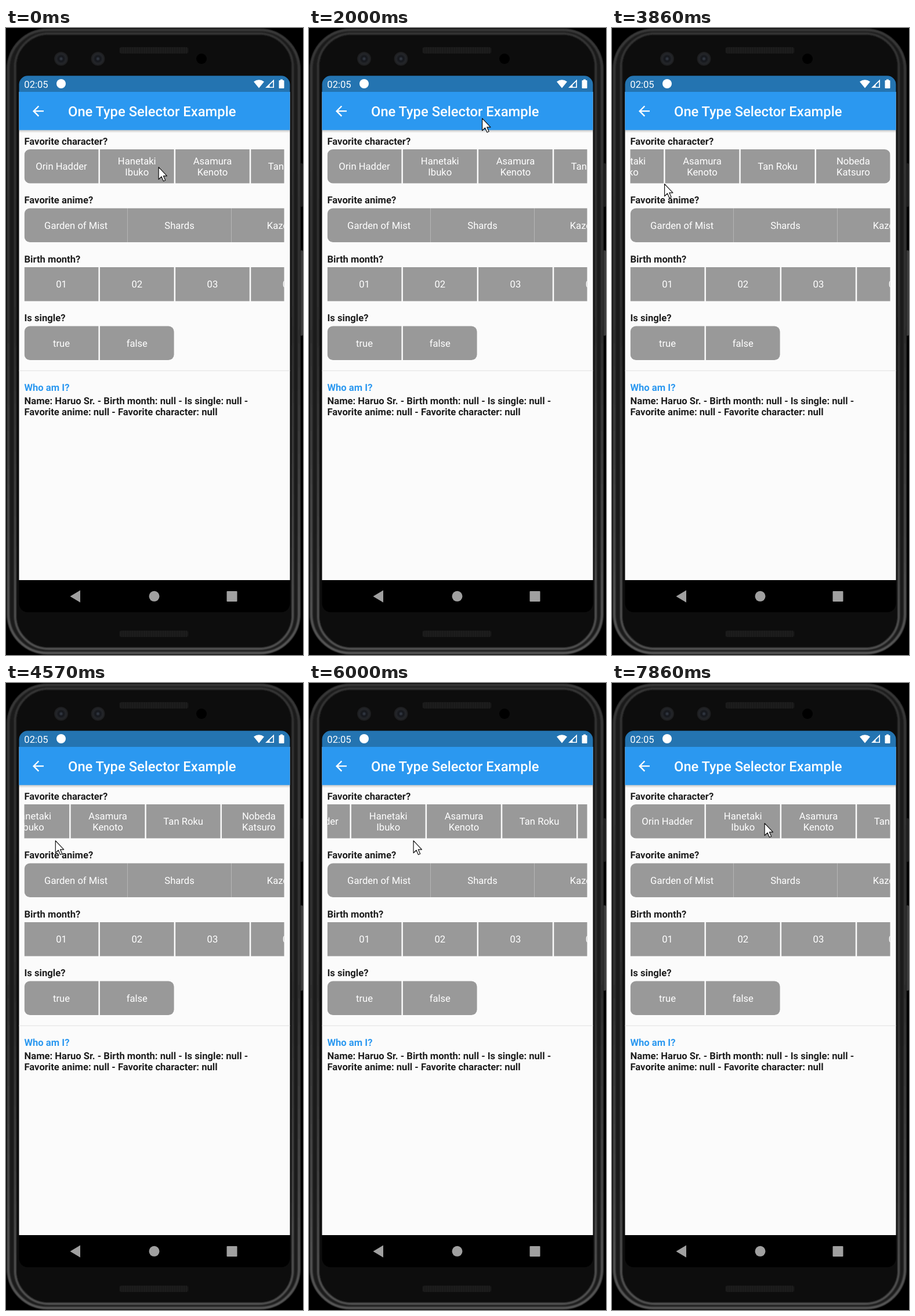
These frames come from a looping animation (512x1080 px, 8000 ms). An HTML page:

```html
<!DOCTYPE html>
<html lang="en">
<head>
<meta charset="utf-8">
<title>One Type Selector Example</title>
<style>
  html, body { margin: 0; width: 100%; height: 100%; overflow: hidden; background: #000; }
  svg { display: block; width: 512px; height: 1080px; }
  text { font: 16.63px Roboto, sans-serif; fill: #fff; text-rendering: geometricPrecision; }
  .mid { text-anchor: middle; }
  .bold { font-weight: 700; fill: #1d1d1d; }
  .title { font-size: 23.76px; font-weight: 500; }
  .link { fill: #2b98f0; }
</style>
</head>
<body>
<svg viewBox="0 0 512 1080">
  <defs>
    <linearGradient id="rim" x2="0" y2="1">
      <stop offset="0" stop-color="#3a3a3a"/>
      <stop offset=".5" stop-color="#333"/>
      <stop offset="1" stop-color="#5c5c5c"/>
    </linearGradient>
    <linearGradient id="shade" x2="0" y2="1">
      <stop offset="0" stop-color="#000" stop-opacity=".2"/>
      <stop offset="1" stop-color="#000" stop-opacity="0"/>
    </linearGradient>
    <radialGradient id="lens">
      <stop offset="0" stop-color="#39404c"/>
      <stop offset=".35" stop-color="#14161b"/>
      <stop offset=".7" stop-color="#24262a"/>
      <stop offset="1" stop-color="#1b1b1c"/>
    </radialGradient>
    <pattern id="mesh" width="3" height="12" patternUnits="userSpaceOnUse">
      <rect width="3" height="12" fill="#1f1f1f"/>
      <rect width="1" height="12" fill="#121212"/>
    </pattern>
    <filter id="soft"><feGaussianBlur stdDeviation=".8"/></filter>
    <clipPath id="screen"><rect x="22.500" y="82.300" width="467" height="924" rx="15"/></clipPath>
    <clipPath id="list"><rect x="31.500" y="200" width="448" height="380"/></clipPath>
  </defs>

  <!-- phone body -->
  <rect x="507" y="233" width="5" height="75" rx="2" fill="#1d1d1d"/>
  <rect x="507" y="383" width="5" height="147" rx="2" fill="#3a3a3a"/>
  <rect x="1" y="1" width="507" height="1078" rx="70" fill="#1a1a1a"/>
  <g fill="none" stroke="url(#rim)" filter="url(#soft)">
    <rect x="4" y="3.500" width="501" height="1073" rx="67" stroke-width="4"/>
    <rect x="15.500" y="9.500" width="479" height="1060" rx="58" fill="#070707" stroke-width="3"/>
  </g>
  <rect x="196" y="33" width="118" height="11" rx="3" fill="url(#mesh)"/>
  <rect x="196" y="1038" width="118" height="11" rx="3" fill="url(#mesh)"/>
  <circle cx="95" cy="53" r="12" fill="url(#lens)"/>
  <circle cx="158.500" cy="53" r="12" fill="url(#lens)"/>
  <circle cx="337" cy="53" r="9" fill="#000"/>

  <g clip-path="url(#screen)">
    <rect x="22" y="82" width="468" height="925"/>
    <rect x="22" y="110" width="468" height="841" fill="#fbfbfb"/>
    <rect x="22" y="82" width="468" height="28" fill="#2474b1"/>
    <rect x="22" y="110" width="468" height="65.800" fill="#2b98f0"/>
    <rect x="22" y="175.800" width="468" height="5" fill="url(#shade)"/>
    <rect x="22" y="589.700" width="468" height="1.200" fill="#e4e4e4"/>
  </g>

  <!-- status bar and title -->
  <text x="31.300" y="102.500">02:05</text>
  <g fill="#fff">
    <circle cx="95" cy="96" r="8"/>
    <path d="M427 92.500Q436 86 445 92.500L436 103.500Z"/>
    <path d="M462 88.500V103H447Z"/>
    <rect x="470.500" y="90" width="9" height="14" rx="1"/>
    <rect x="473" y="88.500" width="4" height="2"/>
    <path transform="translate(41.2 128.900) scale(1.188)"
      d="M20 11H7.830l5.590-5.590L12 4l-8 8 8 8 1.410-1.410L7.830 13H20z"/>
  </g>
  <path d="M460.300 92.500V101.400H454.500V98.300Z" fill="#2474b1"/>
  <text class="title" x="107" y="152">One Type Selector Example</text>

  <g id="labels"></g>
  <g clip-path="url(#list)"><g id="rows"></g></g>
  <text class="bold link" x="31.500" y="625">Who am I?</text>
  <text class="bold" x="31.500" y="648.200">Name: Haruo Sr. - Birth month: null - Is single: null -</text>
  <text class="bold" x="31.500" y="667.300">Favorite anime: null - Favorite character: null</text>

  <!-- navigation bar -->
  <g fill="#a0a0a0">
    <path d="M110.500 979L128 968.500V989.500Z"/>
    <circle cx="255.500" cy="978.800" r="9"/>
    <rect x="380.500" y="970" width="18" height="18" rx="1"/>
  </g>
  <path id="cursor" fill="#fff" stroke="#111" stroke-width="1.2" stroke-linejoin="round"
    d="M.6.600V21.700L5.500 17L9 24.700L12.200 23.300L8.800 15.800H15Z"/>
</svg>
<script>
const $ = id => document.getElementById(id);

function add(parent, tag, attrs, text = '') {
  const el = document.createElementNS('http://www.w3.org/2000/svg', tag);
  for (const k in attrs) el.setAttribute(k, attrs[k]);
  el.textContent = text;
  return parent.appendChild(el);
}

// Rectangle with separate corner radii on its left and right side
const box = (x, y, w, h, l, r) =>
  `M${x + l} ${y}h${w - l - r}a${r} ${r} 0 0 1 ${r} ${r}v${h - 2 * r}a${r} ${r} 0 0 1 ${-r} ${r}` +
  `h${l + r - w}a${l} ${l} 0 0 1 ${-l} ${-l}v${2 * l - h}a${l} ${l} 0 0 1 ${l} ${-l}z`;

function row(index, label, names, pitch, gap, radius) {
  const top = 209 + index * 101.5, w = pitch - gap;
  add($('labels'), 'text', { class: 'bold', x: 31.5, y: top - 8.2 }, label);
  const g = add($('rows'), 'g', {});
  names.forEach((name, i) => {
    const x = 31.7 + i * pitch;
    const l = i ? 0 : radius, r = i < names.length - 1 ? 0 : radius;
    add(g, 'path', { d: box(x, top, w, 58.6, l, r), fill: '#999' });
    const lines = name.split('|');
    lines.forEach((line, n) => add(g, 'text', {
      class: 'mid', x: x + w / 2, y: top + 35.4 + (n - (lines.length - 1) / 2) * 19
    }, line));
  });
  return g;
}

const characters = row(0, 'Favorite character?',
  ['Orin Hadder', 'Hanetaki|Ibuko', 'Asamura|Kenoto', 'Tan Roku', 'Nobeda|Katsuro'], 130.2, 2.5, 9.5);
row(1, 'Favorite anime?', ['Garden of Mist', 'Shards', 'Kazeno', 'Moon Ferry'], 178.3, .3, 9.5);
row(2, 'Birth month?', ['01', '02', '03', '04', '05'], 130.2, 2.5, 0);
row(3, 'Is single?', ['true', 'false'], 130.2, 2.5, 9.5);
const ripple = add(characters, 'circle', { cx: 323.5, cy: 246.5, fill: '#000' });

// time, cursor x, cursor y, list scroll
const keys = [
  [0, 262.5, 239, 0], [1143, 292, 172, 0], [1286, 292, 172, 0], [1571, 297, 158, 0],
  [1857, 297, 158, 0], [2000, 298, 155, 0], [3000, 320, 246, 0], [3143, 300, 246, 0],
  [3286, 238.5, 247, 53.5], [3571, 120, 262, 171], [3857, 90, 268, 200.5], [4143, 45, 272, 200.5],
  [4429, 65, 271, 200.5], [5000, 144, 271, 120.2], [5143, 144, 271, 120.2], [5571, 164, 271, 104],
  [5714, 164, 271, 104], [6000, 179.5, 271, 89], [6714, 266, 262, 3], [6857, 266, 262, 3],
  [7000, 268, 258, 0], [7143, 268, 258, 0], [7857, 262.5, 241, 0], [8000, 262.5, 241, 0]
];

function pose(t) {
  const i = Math.max(1, keys.findIndex(k => k[0] >= t));
  const a = keys[i - 1], b = keys[i], p = (t - a[0]) / (b[0] - a[0]);
  return a.map((v, n) => v + (b[n] - v) * p);
}

const start = performance.now();
function draw() {
  const step = Math.floor(((performance.now() - start) % 8000 + 3) * 7 / 1000) % 56;
  const t = step * 1000 / 7;
  const [, x, y, scroll] = pose(t);
  $('cursor').setAttribute('transform', `translate(${x} ${y})`);
  characters.setAttribute('transform', `translate(${-scroll} 0)`);
  const age = (t - 3000) / 286;
  ripple.setAttribute('r', Math.max(0, 4 + 3.5 * age));
  ripple.setAttribute('opacity', age >= 0 && age < 1.6 ? .07 : 0);
  requestAnimationFrame(draw);
}
draw();
</script>
</body>
</html>
```
